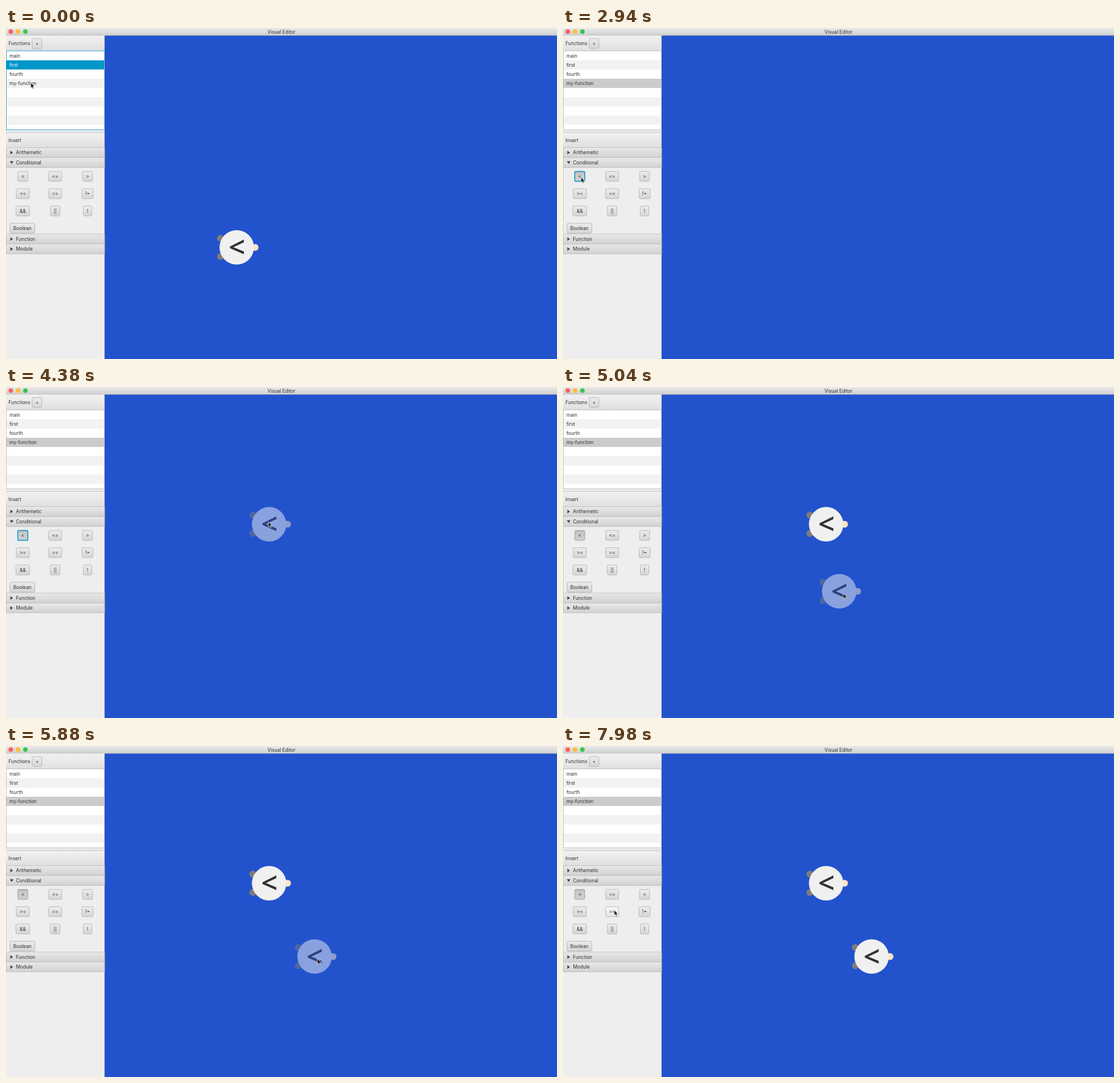
An HTML page that plays this animation: 966x580 px, repeating every 8 s.

```html
<!DOCTYPE html>
<html lang="en">
<head>
<meta charset="utf-8">
<title>Visual Editor</title>
<style>
  html, body { margin: 0; width: 100%; height: 100%; overflow: hidden; }
  svg { display: block; width: 100vw; height: 100vh; }
  text { font: 8.3px Inter, sans-serif; fill: #2f2f2f; }
  .mid { text-anchor: middle; }
  .sign { font: 600 51px "Open Sans", sans-serif; fill: #333; text-anchor: middle; }
</style>
</head>
<body>
<svg id="stage" viewBox="0 0 966 580">
  <defs>
    <linearGradient id="title" x2="0" y2="1"><stop stop-color="#e9e9e9"/><stop offset="1" stop-color="#d0d0d0"/></linearGradient>
    <linearGradient id="bar" x2="0" y2="1"><stop stop-color="#f1f1f1"/><stop offset="1" stop-color="#e0e0e0"/></linearGradient>
    <linearGradient id="pane" x2="0" y2="1"><stop stop-color="#e8e8e8"/><stop offset="1" stop-color="#d2d2d2"/></linearGradient>
    <linearGradient id="btn" x2="0" y2="1"><stop stop-color="#ececec"/><stop offset="1" stop-color="#d5d5d5"/></linearGradient>
    <linearGradient id="hover" x2="0" y2="1"><stop stop-color="#f7f7f7"/><stop offset="1" stop-color="#e4e4e4"/></linearGradient>
    <linearGradient id="down" x2="0" y2="1"><stop stop-color="#b4b4b4"/><stop offset=".25" stop-color="#c9c9c9"/><stop offset="1" stop-color="#cecece"/></linearGradient>
    <clipPath id="canvas"><path d="M173.5 13.5H966V580H173.5Z"/></clipPath>
  </defs>
</svg>
<script>
const LOOP = 8000, STEP = 60;
const SELECT = 900, PRESS = 2640, DROP_1 = 4440, DROP_2 = 6600;
const ROW = 16.15, LIST_TOP = 40.5, EDGE = 173;
const ACCENT = '#0096c9';

const stage = document.getElementById('stage');

function el(tag, attrs, parent = stage, text) {
  const node = document.createElementNS('http://www.w3.org/2000/svg', tag);
  set(node, attrs);
  if (text) node.textContent = text;
  return parent.appendChild(node);
}
function set(node, attrs) {
  for (const key in attrs) node.setAttribute(key, attrs[key]);
}
const rect = (x, y, width, height, fill, extra) =>
  el('rect', { x, y, width, height, fill, ...extra });
const circle = (cx, cy, r, fill, parent) => el('circle', { cx, cy, r, fill }, parent);
const label = (x, y, text, extra) => el('text', { x, y, ...extra }, stage, text);
const show = (node, on) => set(node, { visibility: on ? 'visible' : 'hidden' });
const place = (node, [x, y]) => set(node, { transform: `translate(${x} ${y})` });

// Window and canvas
rect(0, 0, 966, 580, '#eee');
rect(EDGE, 13, 793, 567, '#2253cd');
rect(0, 0, 966, 13, 'url(#title)');
rect(0, 12.6, 966, .8, '#b4b4b4');
['#fc605b', '#fdbc40', '#34c84a'].forEach((c, i) => circle(8.4 + 12.8 * i, 6.3, 4, c));
label(483, 9.6, 'Visual Editor', { class: 'mid' });

// Sidebar: function list
rect(0, 13.4, EDGE, 26.4, 'url(#bar)');
label(4.5, 30.4, 'Functions');

const names = ['main', 'first', 'fourth', 'my-function'];
const rows = [], rowTexts = [];
for (let i = 0; i < 9; i++) {
  const y = LIST_TOP + i * ROW;
  rows.push(rect(1, y, 171.5, Math.min(ROW, 178 - y), '#fff'));
  if (names[i]) rowTexts.push(label(6, y + 11, names[i]));
}
const listFrame = rect(.5, 40, 172, 138.5, 'none');

// Sidebar: insert panel
rect(0, 183, EDGE, 26, 'url(#bar)');
rect(0, 182.5, EDGE, 1, '#bdbdbd');
label(4.5, 199.8, 'Insert');

function pane(y, text, open) {
  rect(.5, y, 172.5, 17.4, 'url(#pane)', { stroke: '#b9b9b9', 'stroke-width': .8 });
  el('path', { fill: '#444', d: open ? `M6.7 ${y + 6.4}h6.4l-3.2 4.8Z` : `M7.6 ${y + 5.6}v6.4l4.6 -3.2Z` });
  label(17.5, y + 11.8, text);
}
pane(209.5, 'Arithemetic');
pane(227, 'Conditional', true);
pane(361, 'Function');
pane(378.4, 'Module');
rect(0, 245, .8, 116, '#c4c4c4');
rect(EDGE - .8, 13.4, .8, 566.6, '#c2c2c2');

function button(cx, cy, w, text) {
  const box = { x: cx - w / 2, y: cy - 8.7, w, h: 17.4 };
  const body = rect(box.x, box.y, w, box.h, 'url(#btn)', { rx: 2, stroke: '#b5b5b5', 'stroke-width': .9 });
  label(cx, cy + 3, text, { class: 'mid' });
  return { ...box, body };
}
button(54.4, 27.2, 17, '+');
const ops = [
  ['<', 17.6], ['<=', 23], ['>', 17.6],
  ['>=', 23], ['==', 23], ['!=', 19.6],
  ['&&', 24], ['||', 17], ['!', 15]
];
const buttons = ops.map(([text, w], i) =>
  button(29.4 + 56.8 * (i % 3), 260 + 30.3 * Math.floor(i / 3), w, text));
buttons.push(button(28.8, 350.8, 43.6, 'Boolean'));

// Nodes
const layer = el('g', { 'clip-path': 'url(#canvas)' });
function block(x, y) {
  const g = el('g', {}, layer);
  circle(-28.5, -16, 6, '#7f7b78', g);
  circle(-28.5, 16.2, 6, '#7f7b78', g);
  circle(32.3, 0, 6, '#fee3c4', g);
  circle(0, 0, 30.2, '#f0f0f0', g);
  el('text', { x: .4, y: 17.6, class: 'sign' }, g, '<');
  place(g, [x, y]);
  return g;
}
const oldNode = block(404.5, 384.4);
const nodeA = block(461.3, 240.5);
const nodeB = block(541, 368.9);
const ghost = block(0, 0);
set(ghost, { opacity: .5 });

const pointer = el('path', {
  d: 'M0 0V9.3L2.1 7.4L3.5 10.6L5.1 9.9L3.7 6.8H6.5Z',
  fill: '#111', stroke: '#fff', 'stroke-width': .7, 'stroke-linejoin': 'round'
});

// Motion: time, x, y
const pointerPath = [
  [0, 43.5, 96], [840, 60, 96], [1080, 81.7, 94], [1380, 81.7, 94],
  [2500, 31.7, 261.5], [3060, 31.7, 261.5], [3840, 458, 238], [4380, 460, 236],
  [DROP_1, 460, 236], [4680, 461, 346], [5340, 514, 373.5], [5760, 546, 373],
  [7200, 546, 373], [7900, 90, 287.6]
];
const ghostPath = [
  [3060, 28, 257], [3840, 459, 240], [4380, 461.3, 240.5], [DROP_1, 461.3, 240.5],
  [4680, 457, 345], [5340, 505, 367.8], [5760, 541, 368.9],
  [7200, 541, 368.9], [7900, 86, 284]
];

function along(path, t) {
  const next = path.findIndex(p => p[0] > t);
  if (next < 1) return path.at(next ? -1 : 0).slice(1);
  const [t0, x0, y0] = path[next - 1], [t1, x1, y1] = path[next];
  const k = (t - t0) / (t1 - t0), e = k * k * (3 - 2 * k);
  return [x0 + (x1 - x0) * e, y0 + (y1 - y0) * e];
}

function draw(t) {
  const [px, py] = along(pointerPath, t);
  const selected = t < SELECT ? 1 : 3;
  const listFocus = t < PRESS;

  rows.forEach((row, i) => set(row, {
    fill: i === selected ? (listFocus ? ACCENT : '#cbcbcb') : i % 2 ? '#f2f2f2' : '#fff'
  }));
  rowTexts.forEach((text, i) => {
    text.style.fill = i === selected && listFocus ? '#fff' : '';
  });
  set(listFrame, { stroke: listFocus ? '#2ba4d2' : '#bdbdbd' });

  buttons.forEach((b, i) => {
    const over = px > b.x && px < b.x + b.w && py > b.y && py < b.y + b.h;
    const down = i === 0 && t >= PRESS;
    const focus = down && t < DROP_1;
    set(b.body, {
      fill: `url(#${down ? 'down' : over ? 'hover' : 'btn'})`,
      stroke: focus ? '#1c9dcc' : down ? '#9c9c9c' : '#b5b5b5',
      'stroke-width': focus ? 1.7 : .9
    });
  });

  show(oldNode, t < SELECT);
  show(nodeA, t >= DROP_1);
  show(nodeB, t >= DROP_2);
  show(ghost, t >= 3060 && px > EDGE);
  place(ghost, along(ghostPath, t));
  place(pointer, [px, py]);
}

function tick() {
  const t = performance.now() % LOOP;
  draw(Math.floor(t / STEP) * STEP);
  requestAnimationFrame(tick);
}
tick();
</script>
</body>
</html>
```
